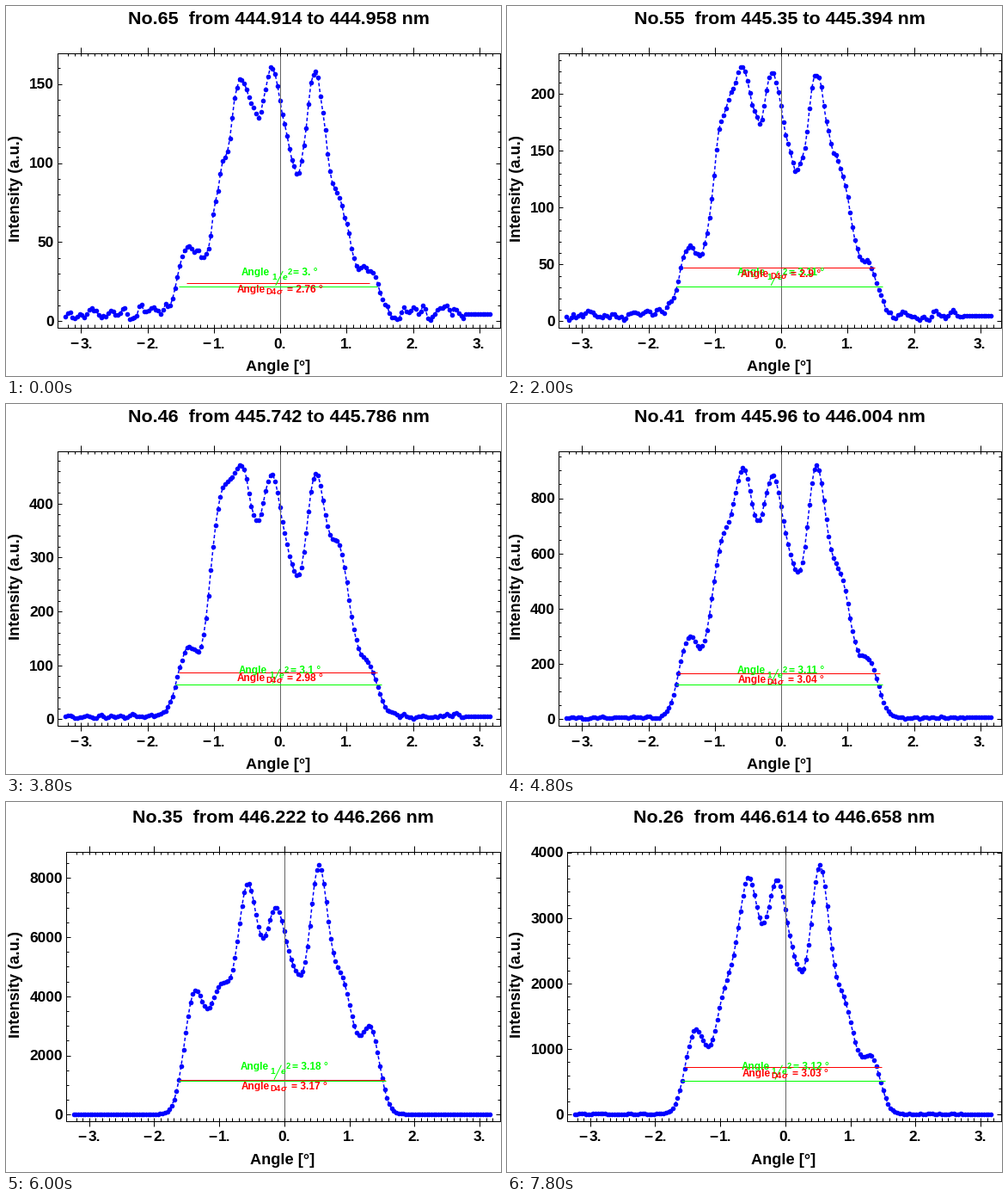
A matplotlib script that plays this animation: 576 by 430 pixels, repeating every 8000 ms.

```python
import numpy as np
import matplotlib.pyplot as plt
from matplotlib.animation import FuncAnimation

W, H, DPI = 576, 430, 100
COUNT, STEP_MS = 40, 200
BLUE, RED, GREEN = "#0000ff", "#ff0000", "#00ff00"
FLOOR = 4.5

plt.rcParams["font.family"] = "Liberation Sans"
plt.rcParams["text.hinting"] = "native"
fig = plt.figure(figsize=(W / DPI, H / DPI), dpi=DPI, facecolor="white")
ax = fig.add_axes([0, 0, 1, 1])

# plot box by digits in the largest tick label: left, right, top, bottom, x of zero
BOXES = {
    3: (60, 574, 55, 373, 318.6),
    4: (70, 574, 58, 370, 323.4),
    5: (83, 575, 62, 365, 329.7),
}

# beam lobes: centre, width, height, change around step 16, change around step 32
LOBES = [
    (-1.38, .15, 27, 0, 22),
    (-1.02, .16, 0, 0, 35),
    (-.90, .16, 45, 38, -30),
    (-.56, .16, 86, 0, 0),
    (-.12, .18, 94, -3, -16),
    (.20, .13, 32, 0, 0),
    (.53, .15, 94, -7, 0),
    (.90, .17, 40, 26, 10),
    (1.33, .14, 17, 2, 18),
]

# key points over the step number
STEPS = [0, 6, 15, 24, 30, 35, 39]
PEAK = [160.5, 189, 276, 919, 8420, 13950, 3800]
D4_WIDTH = [2.76, 2.86, 2.94, 3.04, 3.17, 3.14, 3.03]
E2_WIDTH = [3.0, 3.11, 3.1, 3.11, 3.18, 3.17, 3.12]
D4_LEVEL = [.149, .227, .19, .178, .138, .156, .19]

ANGLE = np.linspace(-3.233, 3.166, 179)


def bump(x, centre, width):
    return np.exp(-.5 * ((x - centre) / width) ** 2)


def at(i, values):
    return np.interp(i, STEPS, values)


def profile(i, peak):
    """Heights from 0 to 1: moving lobes over a noisy floor, flat at the right end."""
    middle, late = bump(i, 16, 5.7), bump(i, 32, 4.2)
    v = sum((a + b * middle + c * late) * bump(ANGLE, centre, width)
            for centre, width, a, b, c in LOBES)
    noise = np.random.default_rng(65 - i).normal(0, 3.2, len(ANGLE))
    noise = np.convolve(noise, [.25, .6, .25], "same")
    noise[ANGLE > 2.8] = 0
    v = np.abs(v / v.max() * peak + FLOOR + noise)
    return v / v.max()


def text(x, y, s, px, ha="left", color="black", **kw):
    ax.text(x, y, s, size=px * 72 / DPI, ha=ha, va="baseline", color=color,
            weight="bold", **kw)


def line(x1, y1, x2, y2, color):
    ax.plot([x1, x2], [y1, y2], color=color, lw=.72, solid_capstyle="butt")


def ticks(xs, ys, dx, dy):
    """Short strokes of size (dx, dy) starting at each point."""
    xs, ys = np.broadcast_arrays(xs, ys)
    gap = np.full(len(xs), np.nan)
    ax.plot(np.column_stack([xs, xs + dx, gap]).ravel(),
            np.column_stack([ys, ys + dy, gap]).ravel(),
            color="black", lw=.72, solid_capstyle="butt")


def pixel(v):
    return np.floor(v) + .5


def trim(v, places):
    return f"{v:.{places}f}".rstrip("0")


def tick_step(top):
    """Spacing of the labelled ticks and the number of parts between them."""
    size = 10 ** np.floor(np.log10(top / 7.5))
    for lead, parts in ((1, 5), (2, 4), (5, 5), (10, 5)):
        if top / (lead * size) <= 7.5:
            return lead * size, parts


def x_ticks(x0, sx, top, bottom):
    # short ticks point into the box, long ones out of it
    for step, size in ((.1, -3.5), (1, 6.5)):
        n = int(3.3 / step)
        xs = pixel(x0 + sx * step * np.arange(-n, n + 1))
        ticks(xs, bottom + .5, 0, size)
        ticks(xs, top - .5, 0, -size)
    for n in range(-3, 4):
        x, y = x0 + n * sx, bottom + 24.5
        if n < 0:
            text(x - 2.5, y, "\u2212", 17.33, "right")
            text(x - .5, y, f"{-n}.", 17.33)
        else:
            text(x, y, f"{n}.", 17.33, "center")


def y_ticks(left, right, y0, scale, top_value, step, parts):
    minor = step / parts
    low = -int(.0237 * top_value / minor)
    for gap, first, size in ((minor, low, 3), (step, 0, 5)):
        v = gap * np.arange(first, int(top_value / gap) + 1)
        ys = pixel(y0 - v * scale)
        ticks(left - .5, ys, size, 0)
        ticks(right + .5, ys, -size, 0)
    for n in range(int(top_value / step) + 1):
        v = int(round(n * step))
        y = y0 - v * scale + 6.3
        if v >= 10000:
            text(left - 4, y, f"{v % 1000:03d}", 17.33, "right")
            text(left - 36, y, str(v // 1000), 17.33, "right")
        else:
            text(left - 4, y, str(v), 17.33, "right")


def width_label(cx, y, value, color, inverse):
    num = trim(value, 2)
    half = (102 if inverse else 100) / 2 - (4 - len(num)) * 3.3
    x, base = cx - half, y + 4.3
    text(x, base, "Angle", 12, color=color)
    if inverse:
        text(x + 35, base + 5, "1", 10, color=color)
        line(x + 39.5, base + 12, x + 48, base - 5, color)
        text(x + 47, base + 5, "e", 10, color=color, style="italic")
        text(x + 53, base - 1, "2", 9.5, color=color)
    else:
        text(x + 34, base + 2, "D4", 9.5, color=color)
        text(x + 46.5, base + 2, "\u03c3", 10, color=color, style="italic")
    text(cx + half, base, f"= {num} \u00b0", 12, "right", color)


def draw(i):
    ax.clear()
    ax.set(xlim=(0, W), ylim=(H, 0))
    ax.axis("off")

    peak = np.exp(at(i, np.log(PEAK)))
    top_value = peak * 1.0545
    step, parts = tick_step(top_value)
    largest = int(round(int(top_value / step) * step))
    left, right, top, bottom, x0 = BOXES[max(3, len(str(largest)))]
    sx = (right - left) * .1502
    height = (bottom - top) * .928
    y0 = bottom - 7.1

    # curve
    xs = x0 + sx * ANGLE
    ys = y0 - height * profile(i, peak)
    ax.plot(xs, ys, color=BLUE, lw=1.1, dashes=(2.6, 1.8), dash_capstyle="butt")
    ax.plot(xs, ys, "o", color=BLUE, ms=5.6 * 72 / DPI, mew=0)

    # frame and ticks
    line(pixel(x0), top, pixel(x0), bottom, "#666666")
    x1, x2, y1, y2 = left - .5, right + .5, top - .5, bottom + .5
    ax.plot([x1, x2, x2, x1, x1], [y1, y1, y2, y2, y1], color="black", lw=.72)
    x_ticks(x0, sx, top, bottom)
    y_ticks(left, right, y0, height / peak, top_value, step, parts)

    # width bars and their labels
    d4, e2 = at(i, D4_WIDTH), at(i, E2_WIDTH)
    y_red = y0 - height * at(i, D4_LEVEL) - .4
    y_green = y0 - height * np.exp(-2)
    centre = x0 - .025 * sx
    for y, width, color in ((y_green, e2, GREEN), (y_red, d4, RED)):
        reach = sx * width / 2
        line(centre - reach, pixel(y), centre + reach, pixel(y), color)
    width_label(x0, y_green - 17.3, e2, GREEN, True)
    width_label(x0, y_red + 7, d4, RED, False)

    # captions
    cx = (left + right) / 2
    start = 444.914 + .0436 * i
    text(cx, top - 34, f"No.{65 - i}  from {trim(start, 3)} to {trim(start + .0436, 3)} nm",
         21.45, "center")
    text(cx - .5, bottom + 51, "Angle [\u00b0]", 18.3, "center")
    text(16.5, (top + bottom) / 2 - 1.5, "Intensity (a.u.)", 18.3, "center",
         rotation=90, rotation_mode="anchor")
    return []


anim = FuncAnimation(fig, draw, frames=COUNT, init_func=lambda: [],
                     interval=STEP_MS, repeat=True, repeat_delay=0)
plt.show()
```
